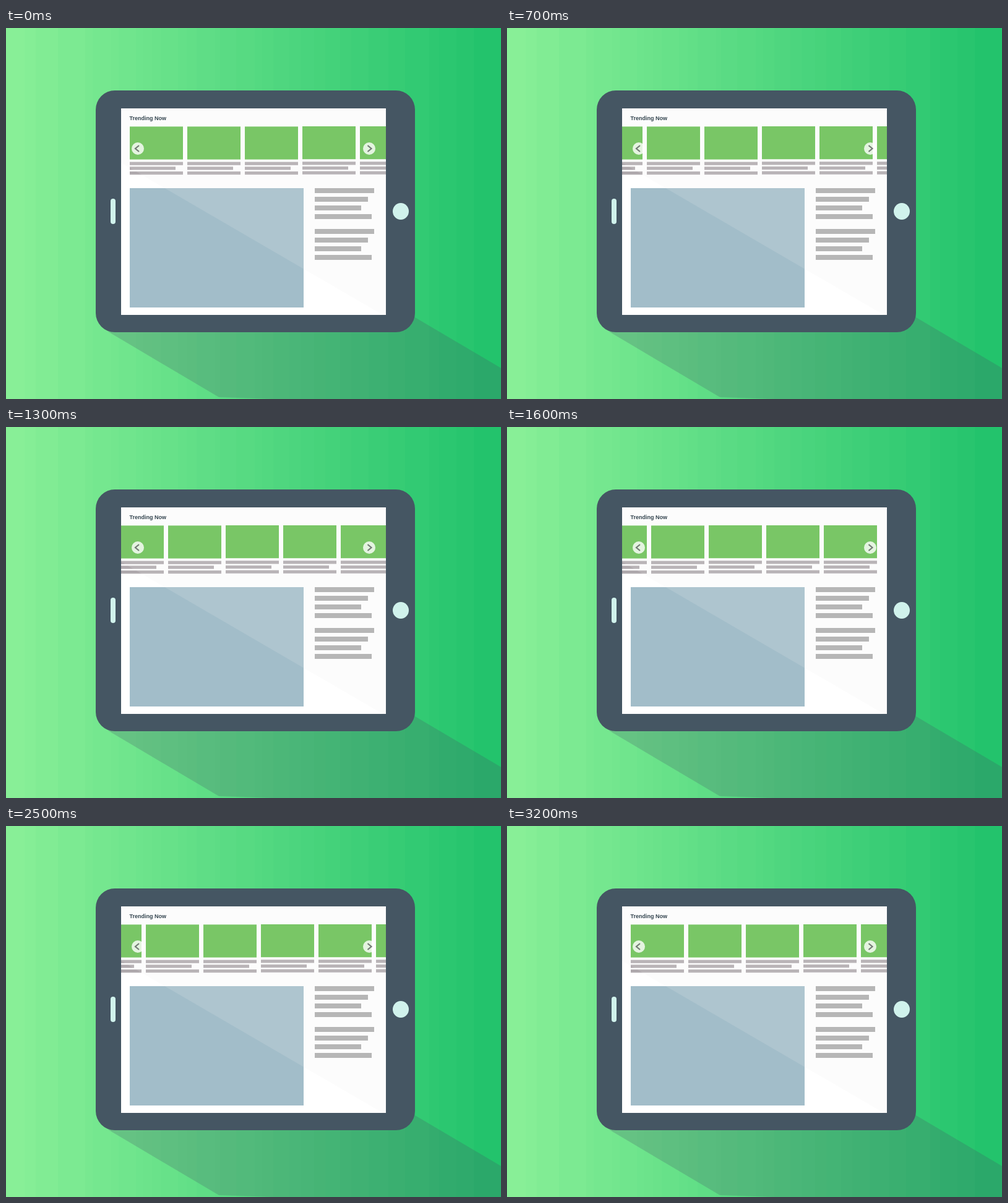
An HTML page that plays this animation: 800 px wide and 600 px high, repeating every 3.3 s.

```html
<!DOCTYPE html>
<html lang="en">
<head>
<meta charset="utf-8">
<title>Tablet carousel</title>
<style>
  html, body { margin: 0; width: 100%; height: 100%; overflow: hidden; }
  svg { display: block; width: 800px; height: 600px; }
  text { font: bold 9px "Liberation Sans", Arial, sans-serif; fill: #34454f; }
</style>
</head>
<body>
<svg viewBox="0 0 800 600">
  <clipPath id="screen"><rect x="186" y="130" width="428" height="334"/></clipPath>
  <g id="bands" shape-rendering="crispEdges"></g>
  <path d="M165 491L344 597L430 600H800V550L661 468L400 300Z" fill="#465764" opacity=".25"/>
  <rect x="145" y="101" width="516" height="391" rx="31" fill="#455663"/>
  <rect x="169" y="276" width="8" height="41" rx="4" fill="#d0f2ec"/>
  <ellipse cx="638" cy="296.5" rx="13" ry="13.5" fill="#d0f2ec"/>
  <rect x="186" y="130" width="428" height="334" fill="#fff"/>
  <g clip-path="url(#screen)">
    <g id="strip"></g>
    <rect x="200" y="259" width="281" height="193" fill="#a2bdc9"/>
    <g id="side"></g>
    <path d="M186 130H614V464H609L186 218Z" fill="#ececec" opacity=".16"/>
  </g>
  <text x="199.5" y="149">Trending Now</text>
  <g fill="#fff" fill-opacity=".8">
    <circle cx="213" cy="195" r="10"/>
    <circle cx="587" cy="195" r="10"/>
  </g>
  <path d="M215 190L209 195L215 200M584.5 190L590.5 195L584.5 200" fill="none" stroke="#727a74" stroke-width="2.2"/>
</svg>
<script>
const $ = id => document.getElementById(id);

function rect(parent, x, y, width, height, fill) {
  const el = document.createElementNS('http://www.w3.org/2000/svg', 'rect');
  const attrs = { x, y, width, height, fill };
  for (const name in attrs) el.setAttribute(name, attrs[name]);
  parent.append(el);
}

// Background: flat vertical bands sampled from a linear gradient
const LEFT = [138, 240, 152], RIGHT = [32, 194, 107];
const edges = [0, 30, 48, 84, 128, 140, 170, 182, 210, 222, 236, 250, 278, 292, 308,
  338, 346, 372, 402, 414, 432, 458, 476, 498, 516, 540, 558, 586, 618, 645, 684, 700, 728, 756, 800];
for (let i = 0; i < edges.length - 1; i++) {
  const x = edges[i], end = edges[i + 1], mix = (x + end) / 1600;
  const rgb = LEFT.map((c, j) => Math.round(c + (RIGHT[j] - c) * mix));
  rect($('bands'), x, 0, end - x, 600, `rgb(${rgb})`);
}

// Carousel cards, each with three caption lines
for (let i = 0; i < 6; i++) {
  const x = 200 + 93 * i, y = i < 3 ? 159.4 : 159;
  rect($('strip'), x, y, 86, 53.2, '#63bf4c');
  [86, 74, 86].forEach((w, j) => rect($('strip'), x, y + 57.2 + 7.7 * j, w, 5.2, '#afa9ad'));
}

// Sidebar paragraphs
for (const top of [259, 325])
  [96, 86, 75, 92].forEach((w, i) => rect($('side'), 499, top + 14 * i, w, 8, '#ababab'));

// The strip slides left and back at constant speed in 100 ms steps
const TRAVEL = 153, HALF = 16, LOOP = 3300;
const start = performance.now();
function draw() {
  const step = Math.floor((performance.now() - start) % LOOP / 100);
  const shift = Math.round(TRAVEL * (1 - Math.abs(step - HALF) / HALF));
  $('strip').setAttribute('transform', `translate(${-shift} 0)`);
  requestAnimationFrame(draw);
}
draw();
</script>
</body>
</html>
```
